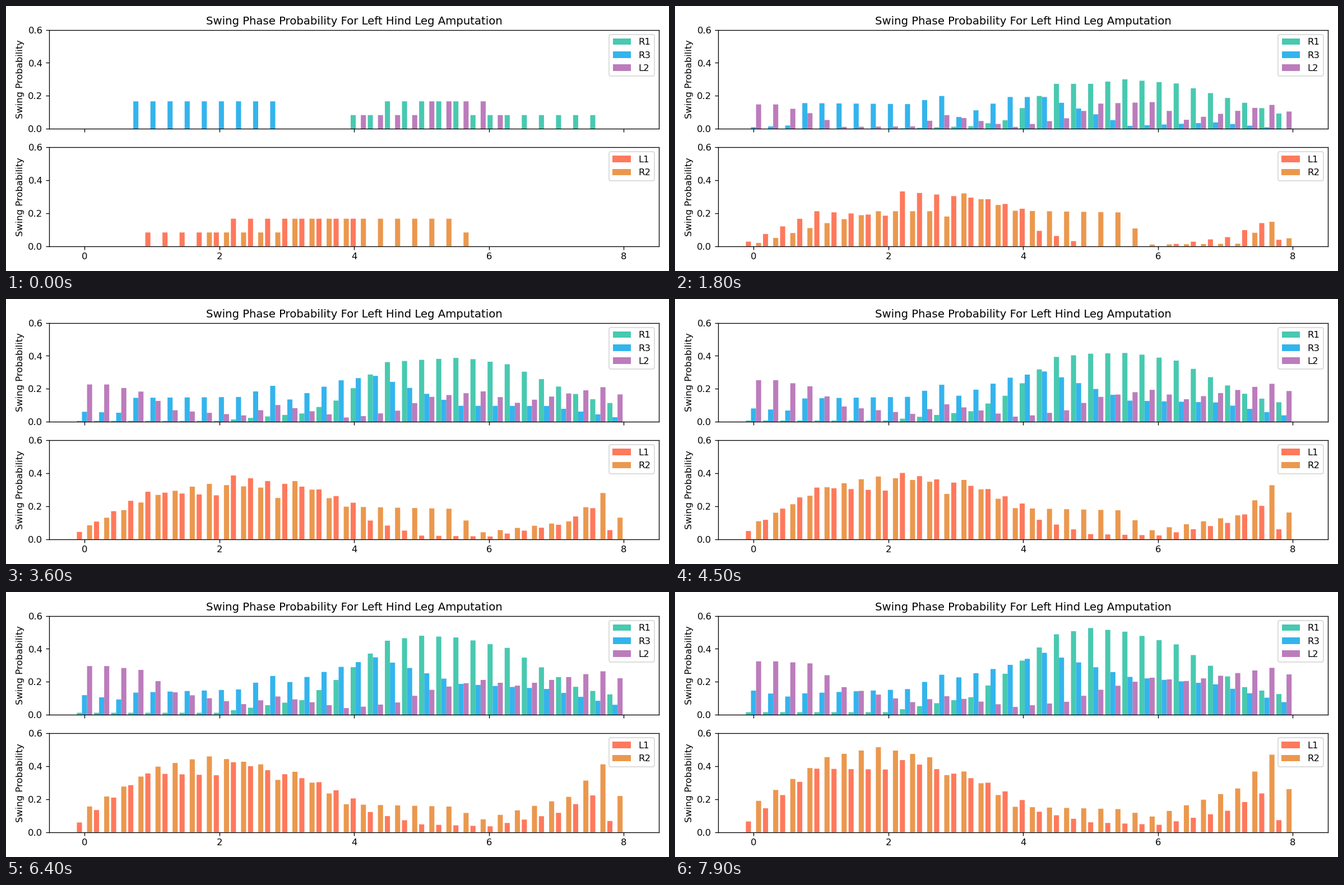
A matplotlib script that plays this animation: 1183 by 473 pixels, repeating every 8 s.

```python
import matplotlib.pyplot as plt
import numpy as np
from matplotlib.animation import FuncAnimation

BINS, STEP, BAR = 32, 0.2539, 0.0755
TRIALS = 12              # trials already counted at the start
EARLY, LATE = 17, 78     # trials added when each profile is reached

plt.rcParams["font.family"] = "DejaVu Sans"
fig, (upper, lower) = plt.subplots(2, 1, sharex=True, figsize=(10, 3.999),
                                   dpi=118.3, facecolor="white")


class Leg:
    """Bars showing the running mean of swing counts per bin."""

    def __init__(self, ax, name, color, slot, runs, points):
        # runs: lengths of the stretches holding 0, 1, 2, 1 and 0 swings
        # points: (bin, early mean, late mean), means in thousandths
        bins = np.arange(BINS)
        keys, early, late = np.transpose(points)
        self.start = np.repeat([0, 1, 2, 1, 0], runs)
        self.early = np.interp(bins, keys, early) / 1000 * (TRIALS + EARLY)
        self.late = np.interp(bins, keys, late) / 1000 * (TRIALS + LATE)
        self.bars = ax.bar(bins * STEP + slot * BAR, self.start / TRIALS, BAR,
                           color=color, label=name, snap=False)

    def totals(self, added):
        """Swings so far: a steady rate first, then easing into a new rate."""
        first_rate = (self.early - self.start) / EARLY
        if added <= EARLY:
            return self.start + first_rate * added
        span, t = LATE - EARLY, added - EARLY
        mean_rate = (self.late - self.early) / span
        rate = (first_rate + mean_rate) / 2
        return self.early + rate * t + (mean_rate - rate) * t * t / span

    def show(self, added):
        for bar, mean in zip(self.bars, self.totals(added) / (TRIALS + added)):
            bar.set_height(mean)


legs = [
    Leg(upper, "R1", "#48c9b0", -1, [16, 2, 5, 8, 1],
        [(8, 0, 16), (13, 16, 107), (15, 52, 249), (18, 273, 488),
         (20, 273, 526), (22, 300, 504), (25, 275, 427), (29, 158, 168),
         (31, 93, 126)]),
    Leg(upper, "R3", "#34b4ed", 0, [3, 0, 9, 0, 20],
        [(0, 10, 147), (2, 20, 111), (3, 156, 130), (9, 150, 156),
         (11, 199, 243), (12, 72, 227), (15, 193, 303), (17, 193, 376),
         (22, 18, 230), (27, 39, 185), (31, 0, 77)]),
    Leg(upper, "L2", "#bc7cbc", 1, [16, 4, 4, 1, 7],
        [(1, 148, 324), (3, 95, 312), (5, 12, 168), (9, 15, 77),
         (11, 83, 113), (15, 12, 48), (18, 64, 79), (20, 153, 152),
         (23, 162, 225), (25, 55, 205), (30, 145, 285), (31, 105, 245)]),
    Leg(lower, "L1", "#ff795c", -1, [4, 5, 8, 0, 15],
        [(0, 28, 65), (4, 212, 385), (8, 185, 380), (9, 332, 437),
         (14, 285, 300), (16, 227, 195), (17, 93, 124), (20, 0, 60),
         (24, 0, 45), (28, 55, 130), (30, 140, 235), (31, 39, 73)]),
    Leg(lower, "R2", "#eb984e", 1, [7, 5, 10, 1, 9],
        [(0, 20, 190), (4, 140, 455), (7, 212, 515), (10, 212, 454),
         (11, 180, 346), (12, 320, 368), (15, 215, 154), (21, 205, 140),
         (23, 10, 95), (28, 15, 265), (30, 148, 470), (31, 48, 261)]),
]

upper.set_title("Swing Phase Probability For Left Hind Leg Amputation")
for ax in (upper, lower):
    ax.set(xlim=(-0.525, 8.525), ylim=(0, 0.6), ylabel="Swing Probability",
           xticks=range(0, 9, 2), yticks=[0, 0.2, 0.4, 0.6])
    ax.legend(loc="upper right")
fig.tight_layout()


def update(frame):
    added = max(0, frame - 1)    # the opening state is held for two ticks
    for leg in legs:
        leg.show(added)


anim = FuncAnimation(fig, update, frames=80, interval=100, repeat=True,
                     repeat_delay=0, blit=False)
plt.show()
```
